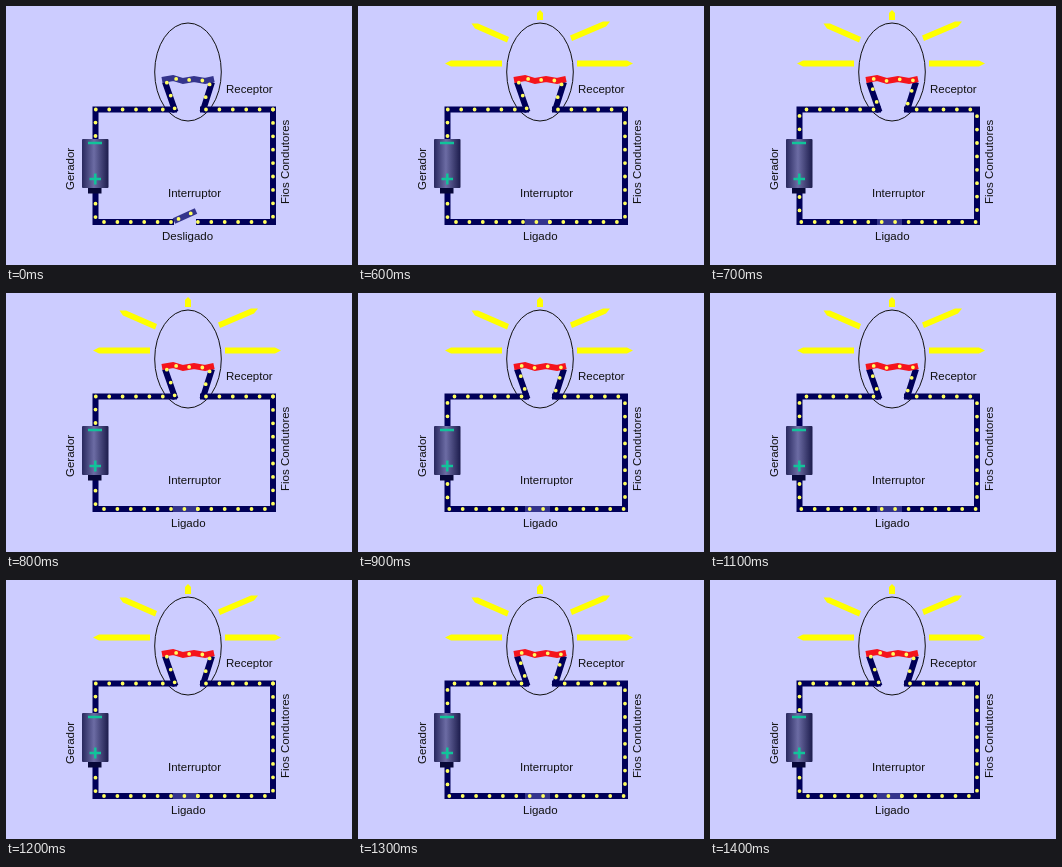
These frames come from a looping animation (346 px wide and 259 px high, 1500 ms). An HTML page:

```html
<!DOCTYPE html>
<html lang="pt">
<meta charset="utf-8">
<style>
  html, body { margin: 0; width: 100%; height: 100%; overflow: hidden; background: #ccf; }
  svg { display: block; width: 100vw; height: 100vh; }
  text { font: 11.5px "Liberation Sans", Arial, sans-serif; fill: #111; }
  path { fill: none; }
  .wire { stroke: #000058; stroke-width: 6; }
  .arm { stroke: #34348c; stroke-width: 6; }
  .hot { stroke: #f5141c; }
  .dots { stroke: #ffff60; stroke-width: 3.8; stroke-linecap: round; stroke-dasharray: 0 13.4; }
  .rays path { fill: #ff0; }
</style>
<svg viewBox="0 0 346 259">
  <defs>
    <linearGradient id="metal">
      <stop offset="0" stop-color="#28285e"/>
      <stop offset=".45" stop-color="#6c6ca4"/>
      <stop offset="1" stop-color="#1c1c4c"/>
    </linearGradient>
    <path id="wires" d="M194 103.500H267V216H190M89.500 186V216H168M89.500 134V103.500H171"/>
    <path id="leads" d="M169.500 106L159 76M196.500 106L206 76"/>
    <path id="filament" d="M156 74L167 72L177 75L188 73L199 75L208 73"/>
    <path id="open" d="M168 215L190 205"/>
    <path id="closed" d="M167 216H192"/>
  </defs>

  <g class="on rays">
    <path d="M87 57.500L93 54.500H144V60.500H93Z"/>
    <path d="M275 57.500L269 54.500H219V60.500H269Z"/>
    <path d="M113.500 17.500L120 17.500L151 31L149 36.500L117 22.500Z"/>
    <path d="M252 15.500L245 15.500L212 29.500L214 35L248 20.500Z"/>
    <path d="M179 14V7L182 4L185 7V14Z"/>
  </g>
  <ellipse cx="182" cy="66" rx="33.300" ry="49" fill="none" stroke="#111"/>

  <use href="#wires" class="wire"/>
  <use href="#leads" class="wire"/>
  <g class="off">
    <use href="#filament" class="arm"/>
    <use href="#open" class="arm"/>
  </g>
  <g class="on">
    <use href="#filament" class="arm hot"/>
    <use href="#closed" class="arm"/>
  </g>

  <g class="dots">
    <path d="M89.500 130V103.500H169L160 74L167 72L177 75L188 73L199 75L205 74L197 100"/>
    <path d="M267 103.500H196"/>
    <path d="M267 103.500V216H191"/>
    <path d="M165 216H89.500V190"/>
    <path class="on" d="M191.800 216H168"/>
    <use href="#open" class="off" stroke-dashoffset="-5"/>
  </g>

  <rect x="76" y="133" width="26.500" height="49" rx="1" fill="url(#metal)"/>
  <rect x="82" y="182" width="13.500" height="5.500" fill="#080838"/>
  <path d="M82 137H96M83.500 173H95M89.300 167.500V178.500" stroke="#10c49a" stroke-width="2.500"/>

  <text x="220" y="87">Receptor</text>
  <text x="162" y="191">Interruptor</text>
  <text class="off" x="156" y="234">Desligado</text>
  <text class="on" x="165" y="234">Ligado</text>
  <text transform="translate(67.500 184) rotate(-90)">Gerador</text>
  <text transform="translate(283 198) rotate(-90)">Fios Condutores</text>
</svg>
<script>
  const LOOP = 1500, SWITCH_ON = 600, STEP = 100;
  const all = selector => document.querySelectorAll(selector);
  const show = (selector, visible) =>
    all(selector).forEach(el => el.style.display = visible ? "" : "none");

  // While current flows, the charges hop half a gap on every step.
  function draw() {
    const t = performance.now() % LOOP;
    const on = t >= SWITCH_ON;
    const shifted = on && Math.floor((t - SWITCH_ON) / STEP) % 2;
    show(".on", on);
    show(".off", !on);
    all(".dots path").forEach(el => el.style.strokeDashoffset = shifted ? 6.7 : 0);
    requestAnimationFrame(draw);
  }
  draw();
</script>
</html>
```
